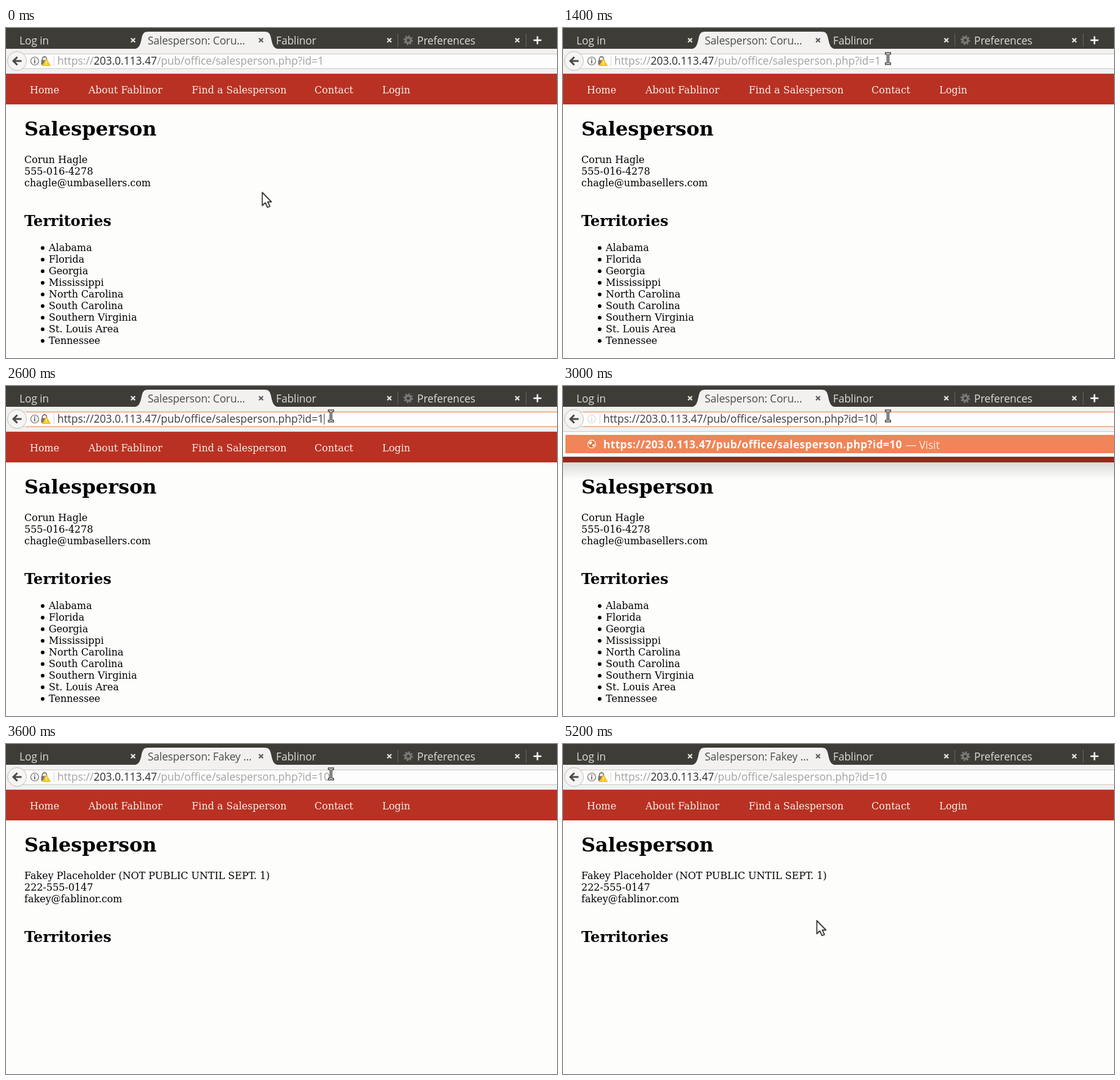
An HTML page that plays this animation: 902x540 px, repeating every 5.4 s.

```html
<!DOCTYPE html>
<html lang="en">
<head>
<meta charset="utf-8">
<title>Salesperson page</title>
<style>
html, body { margin: 0; width: 100%; height: 100%; overflow: hidden; background: #fdfdfc; }
svg { position: absolute; left: 0; top: 0; width: 902px; height: 540px; }
text { white-space: pre; }
.ui { font: 17.45px "Open Sans", "Noto Sans", sans-serif; }
.tabs { letter-spacing: -.1px; }
.line { fill: none; stroke-linecap: butt; }

.page { font: 16px/19px "DejaVu Serif", serif; color: #000; white-space: nowrap; }
.page > *, nav a { position: absolute; left: 30px; margin: 0; padding: 0; }
.page nav { left: 0; top: 75px; width: 902px; height: 50px; background: #b93122; color: #f8efec; }
nav a { top: 17px; }
h1 { top: 146px; font-size: 32px; line-height: 38px; }
h2 { top: 301px; font-size: 24px; line-height: 29px; }
p { top: 206px; }
.page ul { left: 70px; top: 350px; list-style: none; }
li::before { content: ""; position: absolute; left: -13.5px; margin-top: 7px; width: 6px; height: 6px; border-radius: 50%; background: #000; }

/* every change is a hard cut on the shared 5.4 s clock */
.before, .after, .idle, .focus, .clicked, .typed, .secure, .arrow, .beam, .cursor {
  animation: 5400ms step-end infinite;
}
.before { animation-name: before; }
.after { animation-name: after; }
.idle { animation-name: idle; }
.focus { animation-name: focus; }
.clicked { animation-name: clicked; }
.typed { animation-name: typed; }
.secure { animation-name: secure; }
.arrow { animation-name: arrow; }
.beam { animation-name: beam; }
.cursor { animation-name: cursor; }

@keyframes before { 0% { opacity: 1 } 66.66%, 100% { opacity: 0 } }
@keyframes after { 0% { opacity: 0 } 66.66%, 100% { opacity: 1 } }
@keyframes idle { 0% { opacity: 1 } 48.14%, 100% { opacity: 0 } }
@keyframes focus { 0% { opacity: 0 } 48.14% { opacity: 1 } 66.66%, 100% { opacity: 0 } }
@keyframes clicked { 0% { opacity: 0 } 48.14% { opacity: 1 } 55.55%, 100% { opacity: 0 } }
@keyframes typed { 0% { opacity: 0 } 55.55% { opacity: 1 } 66.66%, 100% { opacity: 0 } }
@keyframes secure { 0% { opacity: 1 } 55.55% { opacity: 0 } 66.66%, 100% { opacity: 1 } }
@keyframes arrow { 0% { opacity: 1 } 25.92% { opacity: 0 } 77.77%, 100% { opacity: 1 } }
@keyframes beam { 0% { opacity: 0 } 25.92% { opacity: 1 } 77.77%, 100% { opacity: 0 } }
@keyframes cursor {
  0% { transform: translate(419px, 268px) }
  14.81% { transform: translate(428px, 250px) }
  18.51% { transform: translate(458px, 190px) }
  22.22% { transform: translate(505px, 100px) }
  25.92% { transform: translate(532px, 50px) }
  29.62% { transform: translate(532px, 49px) }
  74.07% { transform: translate(520px, 69px) }
  77.77% { transform: translate(488px, 130px) }
  81.48% { transform: translate(450px, 210px) }
  85.18% { transform: translate(425px, 265px) }
  88.88% { transform: translate(416px, 284px) }
  92.59%, 100% { transform: translate(415px, 288px) }
}
</style>
</head>
<body>
<div class="page">
  <nav>
    <a style="left:39px">Home</a>
    <a style="left:135px">About Fablinor</a>
    <a style="left:304px">Find a Salesperson</a>
    <a style="left:505px">Contact</a>
    <a style="left:616px">Login</a>
  </nav>
  <h1>Salesperson</h1>
  <p class="before">Corun Hagle<br>555-016-4278<br>chagle@umbasellers.com</p>
  <p class="after">Fakey Placeholder (NOT PUBLIC UNTIL SEPT. 1)<br>222-555-0147<br>fakey@fablinor.com</p>
  <h2>Territories</h2>
  <ul class="before">
    <li>Alabama</li>
    <li>Florida</li>
    <li>Georgia</li>
    <li>Mississippi</li>
    <li>North Carolina</li>
    <li>South Carolina</li>
    <li>Southern Virginia</li>
    <li>St. Louis Area</li>
    <li>Tennessee</li>
  </ul>
</div>

<svg viewBox="0 0 902 540">
  <defs>
    <linearGradient id="shade" x2="0" y2="1">
      <stop offset="0" stop-opacity=".25"/>
      <stop offset=".3" stop-opacity=".13"/>
      <stop offset="1" stop-opacity="0"/>
    </linearGradient>
    <path id="close" class="line" d="M-3.3-3.3 3.3 3.3M3.3-3.3-3.3 3.3" stroke-width="2.2"/>
  </defs>

  <!-- tabs -->
  <g class="ui tabs">
    <rect width="902" height="34" fill="#3d3c37"/>
    <rect y="34" width="902" height="41" fill="#f2f1f0"/>
    <path d="M210 34.5C219 33 220 26 222 17C223.5 9 226 6 233 6H423C430 6 432.5 9 434 17C436 26 437 33 446 34.5Z" fill="#f2f1f0"/>
    <g fill="#dfdbd2">
      <text x="22" y="26.5">Log in</text>
      <text x="442" y="26.5">Fablinor</text>
      <text x="673" y="26.5">Preferences</text>
    </g>
    <g fill="#4c4c4c">
      <text class="before" x="232" y="26.5">Salesperson: Coru…</text>
      <text class="after" x="232" y="26.5">Salesperson: Fakey …</text>
    </g>
    <g stroke="#e8e6e2">
      <use href="#close" x="208" y="20"/>
      <use href="#close" x="627.5" y="20"/>
      <use href="#close" x="837" y="20"/>
    </g>
    <use href="#close" x="417.5" y="20" stroke="#5c5b58"/>
    <path class="line" d="M641.5 9V31M851.5 9V31" stroke="#686762"/>
    <g class="line" stroke="#7a7975">
      <circle cx="658.5" cy="20" r="4.2" stroke-width="3.4"/>
      <circle cx="658.5" cy="20" r="6.6" stroke-width="2.6" stroke-dasharray="2.6 2.584"/>
    </g>
    <path class="line" d="M863.5 20H876.5M870 13.5V26.5" stroke="#fff" stroke-width="2.6"/>
  </g>

  <!-- address bar -->
  <g class="ui">
    <rect x="18" y="42.5" width="890" height="24" fill="#fdfdfd" stroke="#cbc9c6"/>
    <path class="line focus" d="M33 42.5H902M33 66.5H902" stroke="#f0a070" stroke-width="1.3"/>
    <path class="line" d="M0 74.5H902" stroke="#cfccc8"/>
    <circle cx="18" cy="54" r="15.5" fill="#f6f5f4" stroke="#bfbcb8"/>
    <path class="line" d="M11.5 54H25.5M18.5 47.5L12 54L18.5 60.5" stroke="#4a4a48" stroke-width="3"/>

    <g class="secure">
      <circle class="line" cx="47" cy="54" r="6.5" stroke="#6c6c6a" stroke-width="1.2"/>
      <path class="line" d="M47 49.8V51.6M47 52.8V58" stroke="#5a5a58" stroke-width="1.7"/>
      <path class="line" d="M59.5 53V50.5A3.5 3.5 0 0 1 66.5 50.5V53" stroke="#777775" stroke-width="1.8"/>
      <rect x="57.5" y="52.5" width="10" height="8" rx="1" fill="#777775"/>
      <path d="M66 50.5L72.5 61.5H59.5Z" fill="#fdc81c" stroke="#f4b010" stroke-linejoin="round"/>
      <path class="line" d="M66 54V58M66 59V60.5" stroke="#fff" stroke-width="1.3"/>
      <path class="line" d="M78.5 46V62" stroke="#d6d5d3"/>
    </g>
    <g class="typed">
      <circle class="line" cx="47" cy="54" r="6.5" stroke="#dcdbd9" stroke-width="1.2"/>
      <path class="line" d="M47 49.8V51.6M47 52.8V58" stroke="#dcdbd9" stroke-width="1.7"/>
      <path class="line" d="M60.5 46V62" stroke="#d6d5d3"/>
    </g>

    <g fill="#a2a19f">
      <text class="idle" x="84" y="60">https://<tspan fill="#2c2c2c">203.0.113.47</tspan>/pub/office/salesperson.php?id=1</text>
      <text class="after" x="84" y="60">https://<tspan fill="#2c2c2c">203.0.113.47</tspan>/pub/office/salesperson.php?id=10</text>
    </g>
    <g fill="#3c3c3c">
      <g class="clicked">
        <text x="84" y="60">https://203.0.113.47/pub/office/salesperson.php?id=1</text>
        <rect x="520.5" y="45" width="1" height="18"/>
      </g>
      <g class="typed">
        <text x="66" y="60">https://203.0.113.47/pub/office/salesperson.php?id=10</text>
        <rect x="512.5" y="45" width="1" height="18"/>
      </g>
    </g>
  </g>

  <!-- suggestion -->
  <g class="ui typed">
    <rect y="115" width="902" height="38" fill="url(#shade)"/>
    <rect y="75" width="902" height="40" fill="#fdfdfd"/>
    <path class="line" d="M0 74.5H902M0 115.5H902" stroke="#cfccc8"/>
    <rect x="4" y="80" width="898" height="30" fill="#f18458"/>
    <circle cx="47" cy="95" r="6.5" fill="#d8743c" stroke="#fff0e8" stroke-width="1.3"/>
    <path d="M42 92L46 90L48 93L45 96L42.5 95ZM48 96L52 94L51.5 98L48.5 100Z" fill="#fff0e8"/>
    <text x="66" y="102" font-weight="bold" letter-spacing=".34" fill="#fff">https://203.0.113.47/pub/office/salesperson.php?id=10</text>
    <text x="561" y="102.5" fill="#ffeee4">— Visit</text>
  </g>

  <!-- pointer -->
  <g class="cursor">
    <path class="arrow" d="M.5 1V22.5L5.5 18L9 25.5L13 23.8L9.5 16.5H15.5Z" fill="#fff" stroke="#3c3c38" stroke-width="1.8" stroke-linejoin="round"/>
    <g class="beam line">
      <path d="M-5-8.5H-2Q0-8.5 0-6.5Q0-8.5 2-8.5H5M0-7V7M-5 8.5H-2Q0 8.5 0 6.5Q0 8.5 2 8.5H5" stroke="#2c2c2a" stroke-width="4.2"/>
      <path d="M-4-8.5H-2Q0-8.5 0-6.5Q0-8.5 2-8.5H4M0-7V7M-4 8.5H-2Q0 8.5 0 6.5Q0 8.5 2 8.5H4" stroke="#f0f0ee" stroke-width="1.3"/>
    </g>
  </g>
</svg>
</body>
</html>
```
